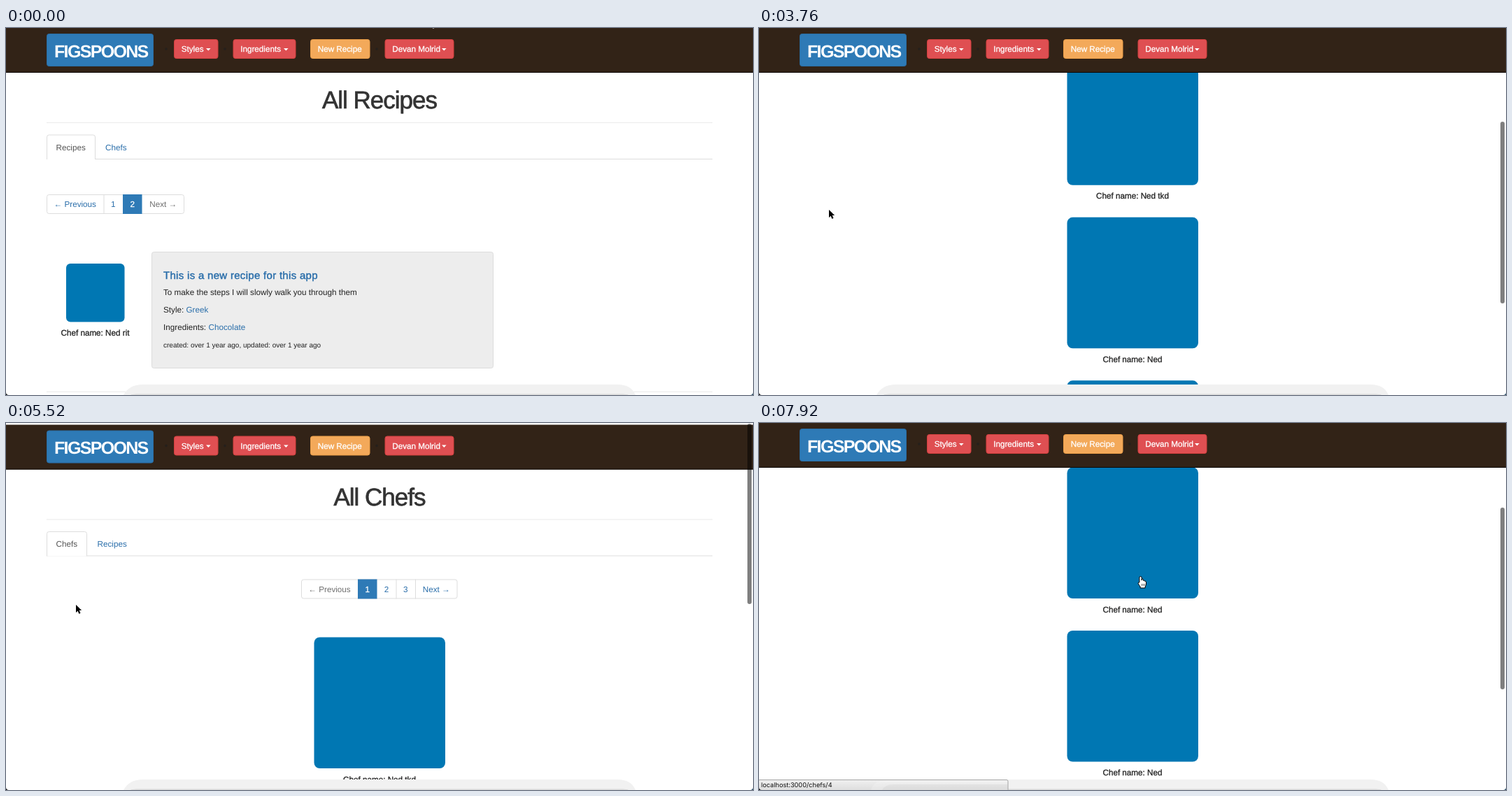
Animation, 1068 px wide and 525 px high, one loop 8000 ms. Source, as an HTML page:

```html
<!DOCTYPE html>
<html lang="en">
<head>
<meta charset="utf-8">
<title>Recipes</title>
<style>
html, body { margin: 0; width: 100%; height: 100%; overflow: hidden; background: #fff; }
svg { display: block; width: 100vw; height: 100vh; }
text { font: 11.7px "Liberation Sans", Arial, sans-serif; fill: currentColor; color: #333; text-rendering: geometricPrecision; white-space: pre; }
.medium { stroke: currentColor; stroke-width: .3px; }
.link { color: #2a6eaa; }
.over { color: #23527c; }
.white { color: #fff; }
.muted { color: #6f6f6f; }
.tab { color: #555; }
.dark { color: #222; }
.title { font-size: 35px; letter-spacing: -1px; stroke: currentColor; stroke-width: .7px; }
.brand { font-size: 25px; font-weight: bold; letter-spacing: -1.67px; }
.recipe { font-size: 15px; letter-spacing: .3px; stroke: currentColor; stroke-width: .45px; }
.small { font-size: 10px; }
.status { font: 9.2px Inter, sans-serif; color: #111; }
</style>
</head>
<body>
<svg id="stage" viewBox="0 0 1068 525" preserveAspectRatio="none"></svg>
<script>
const LOOP = 8000, STEP = 80, MAX_SCROLL = 527;
const BLUE = '#2e7ab6', TILE = '#0077b3', LINE = '#ddd';

// Keyframes: [time, value, ...]
const scrollKeys = [
  [3120, 0], [3200, 2.5], [3360, 30], [3600, 160], [3840, 320], [4080, 450], [4240, 510],
  [4320, 527], [4400, 533], [4480, 531], [4640, 527], [4720, 527], [4800, 515], [4960, 400],
  [5200, 120], [5360, 20], [5440, -5], [5520, -2.5], [5680, 0], [7200, 0], [7280, 8],
  [7440, 110], [7520, 165], [7600, 205], [7680, 228], [7760, 228], [7840, 236], [7920, 240.5]
];
const cursorKeys = [
  [160, 606, -12.5], [240, 604, 4], [320, 596, 17], [480, 586, 28], [560, 586, 28],
  [800, 440, 74], [1040, 300, 112], [1120, 300, 112], [1360, 200, 150], [1680, 144.5, 169.5],
  [2320, 144.5, 169.5], [2640, 116, 225], [2960, 100, 260], [6080, 100, 260], [6240, 190, 258],
  [6400, 380, 246], [6560, 541, 233], [6640, 545.5, 231], [6880, 545.5, 231], [7040, 545.5, 220]
];

function at(keys, t) {
  const i = keys.findIndex(k => k[0] > t);
  if (i === 0) return keys[0].slice(1);
  if (i < 0) return keys[keys.length - 1].slice(1);
  const a = keys[i - 1], b = keys[i], p = (t - a[0]) / (b[0] - a[0]);
  return a.slice(1).map((v, j) => v + (b[j + 1] - v) * p);
}

const text = (x, y, s, cls = '', anchor = 'start') =>
  `<text x="${x}" y="${y}" class="${cls}" text-anchor="${anchor}">${s}</text>`;
const rect = (x, y, w, h, fill, r = 0, stroke = 'none') =>
  `<rect x="${x}" y="${y}" width="${w}" height="${h}" rx="${r}" fill="${fill}" stroke="${stroke}"/>`;
const path = (d, fill, stroke = 'none', more = '') =>
  `<path d="${d}" fill="${fill}" stroke="${stroke}" ${more}/>`;
const rule = (y, color = '#eaeaea') => rect(58, y, 952, 1, color);
const group = (x, y, body) => `<g transform="translate(${x} ${y})">${body}</g>`;

function button(x, w, label, fill, edge, caret) {
  return rect(x + .5, 16.5, w - 1, 27, fill, 3, edge) +
    text(x + 10.7, 34, label, 'white medium') +
    (caret ? path(`M${x + w - 17.5} 29h6.6l-3.3 3.5z`, '#fff') : '');
}

function navbar() {
  const red = ['#df4f52', '#d2403f'];
  return rect(0, 0, 1068, 64, '#322317') + rect(0, 63, 1068, 1, '#0c0805') +
    rect(58.5, 8.5, 152, 46, BLUE, 3, '#2a6da4') + text(69, 41.5, 'FIGSPOONS', 'brand white') +
    [229, 313, 530].map(x => `<circle cx="${x}" cy="30" r="1.8" fill="#25201c"/>`).join('') +
    button(240, 63.5, 'Styles', ...red, true) +
    button(324.5, 90, 'Ingredients', ...red, true) +
    button(435, 85.5, 'New Recipe', '#f3a95a', '#eb9f48') +
    button(541.5, 99, 'Devan Molrid', ...red, true);
}

function heading(title, active, split, other, otherX, hover) {
  return text(534, 115, title, 'title', 'middle') + rule(135) +
    (hover ? rect(split + 1.5, 153, 186 - split - 1.5, 34, '#ececec', 3) : '') +
    rule(187, LINE) +
    path(`M58.5 188V156q0-3 3-3H${split - 3}q3 0 3 3V188`, '#fff', LINE) +
    text(71.5, 174.5, active, 'tab') +
    text(otherX, 174.5, other, hover ? 'over' : 'link');
}

function pager(y, edges, labels, active, disabled, hover) {
  const last = edges.length - 1;
  let out = rect(edges[0] + .5, y + .5, edges[last] - edges[0] - 1, 27, '#fff', 3, LINE);
  labels.forEach((label, i) => {
    const x = edges[i], w = edges[i + 1] - x;
    if (i === active) out += rect(x, y, w, 28, BLUE);
    else if (i === hover) out += rect(x + .5, y + .5, w, 27, '#ececec', 0, LINE);
    else if (i && i !== active + 1) out += rect(x, y, 1, 28, LINE);
    const cls = i === active ? 'white medium' : i === disabled ? 'muted' : i === hover ? 'over' : 'link';
    out += text(x + w / 2, y + 18.3, label, cls, 'middle');
  });
  return out;
}

function recipesPage(hover) {
  return heading('All Recipes', 'Recipes', 127.5, 'Chefs', 142, hover) +
    pager(238, [58, 139.5, 167, 194.5, 255], ['← Previous', '1', '2', 'Next →'], 2, 3) +
    rect(86, 337, 83.5, 83.5, TILE, 6) +
    text(127.5, 440, 'Chef name: Ned rit', 'dark medium', 'middle') +
    rect(208.5, 320.5, 488, 166, '#ededed', 3, '#dcdcdc') +
    text(225, 359, 'This is a new recipe for this app', 'recipe link') +
    text(225, 381.5, 'To make the steps I will slowly walk you through them', 'dark') +
    text(225, 406.5, 'Style:', 'dark') + text(257.5, 406.5, 'Greek', 'link') +
    text(225, 431.5, 'Ingredients:', 'dark') + text(289.5, 431.5, 'Chocolate', 'link') +
    text(225, 456.5, 'created: over 1 year ago, updated: over 1 year ago', 'small dark') +
    rule(520);
}

function chefsPage(page, tabHover, pageHover) {
  const names = [page === 1 ? 'Ned tkd' : 'Ned', 'Ned', 'Ned'];
  return heading('All Chefs', 'Chefs', 115.5, 'Recipes', 130.5, tabHover) +
    pager(221, [422, 503, 530.5, 557.5, 585, 645.5], ['← Previous', '1', '2', '3', 'Next →'],
      page, page === 1 ? 0 : -1, pageHover ? 2 : -1) +
    names.map((name, i) => {
      const y = 304 + 233.5 * i;
      return rect(440.5, y, 187.5, 187.5, TILE, 8) +
        text(534, y + 207, 'Chef name: ' + name, 'dark medium', 'middle');
    }).join('') +
    rule(1009) + text(58, 1039.5, '© FigSpoons 2016', 'muted');
}

function scrollbar(scroll, opacity) {
  const over = Math.max(0, -scroll, scroll - MAX_SCROLL);
  const top = 1 + Math.max(0, scroll) * .499;
  return `<g opacity="${opacity}">${rect(1060, top, 6, 260 - over * .8, 'rgba(0,0,0,.5)', 3)}</g>`;
}

const dock = path('M168 525Q176 510 196 510H874Q894 510 900 525z', '#f1f1f1') +
  path('M178 525q2-1.5 8-1.5H882q6 0 8 1.5z', '#dadada');

const corners = path('M0 521q0 4 4 4H0z', '#000') + path('M1068 521q0 4-4 4h4z', '#16405c');

function statusBar(url) {
  return rect(-1, 510.5, 357, 16, 'url(#bar)', 2, '#a5a5a5') +
    path('M160 525Q164 511 184 511H355V525z', 'rgba(255,255,255,.18)') +
    path('M176 525Q180 517 192 517H355V525z', 'rgba(0,0,0,.04)') +
    text(3, 521, url, 'status');
}

function cursor(x, y, hand) {
  return group(x, y, hand
    ? path('M-1.6 8V1Q-1.6-.5 0-.5T1.6 1V5Q3-.2 4 5.4Q5.6 4.4 6 6.2Q8 5.6 8 8V11Q7.6 13 6.6 14V16H-.4V14Q-2 12.5-3.4 9.6Q-3.4 7.4-1.6 8z',
        '#fff', '#000', 'stroke-width="1" stroke-linejoin="round"') +
      path('M2 10v3M4 10v3M6 10v3', 'none', '#000', 'stroke-width=".6"')
    : path('M0 0V11.2L2.6 8.8L4.4 13L6.5 12.1L4.7 8H8.1z', '#000', '#fff',
        'stroke-width="1" paint-order="stroke"'));
}

function draw(t) {
  const during = (a, b) => t >= a && t < b;
  const [scroll] = at(scrollKeys, t), [x, y] = at(cursorKeys, t);
  const onUser = during(320, 640), onChefs = during(1600, 2240), onRecipes = during(2240, 2480);
  const onTwo = during(6560, 6800), onTile = t >= 7840;

  const page = t < 2240 ? recipesPage(onChefs) : chefsPage(t < 6800 ? 1 : 2, onRecipes, onTwo);
  const path = onUser ? '#' : onChefs ? 'chefs' : onRecipes ? 'recipes' :
    during(6560, 7280) ? 'chefs?page=2' : onTile ? 'chefs/4' : '';
  const bounce = Math.min(MAX_SCROLL, Math.max(0, scroll)) - scroll;
  const thumb = during(2240, 2800) || during(3280, 5840) || t >= 6800 ? 1 :
    during(5840, 6080) ? (6080 - t) / 320 : 0;

  return `<defs><linearGradient id="bar" x2="0" y2="1"><stop stop-color="#f0f0f0"/>
    <stop offset="1" stop-color="#dcdcdc"/></linearGradient></defs>` +
    rect(0, 0, 1068, 525, '#fff') + group(0, -scroll, page) + group(0, bounce, navbar()) +
    (thumb ? scrollbar(scroll, thumb) : '') + dock + (path ? statusBar('localhost:3000/' + path) : '') +
    corners + cursor(x, y, onUser || onChefs || onRecipes || onTwo || onTile);
}

const stage = document.getElementById('stage');
const start = performance.now();
let shown = -1;
function tick() {
  const t = Math.floor((performance.now() - start) % LOOP / STEP) * STEP;
  if (t !== shown) stage.innerHTML = draw(shown = t);
  requestAnimationFrame(tick);
}
tick();
</script>
</body>
</html>
```
